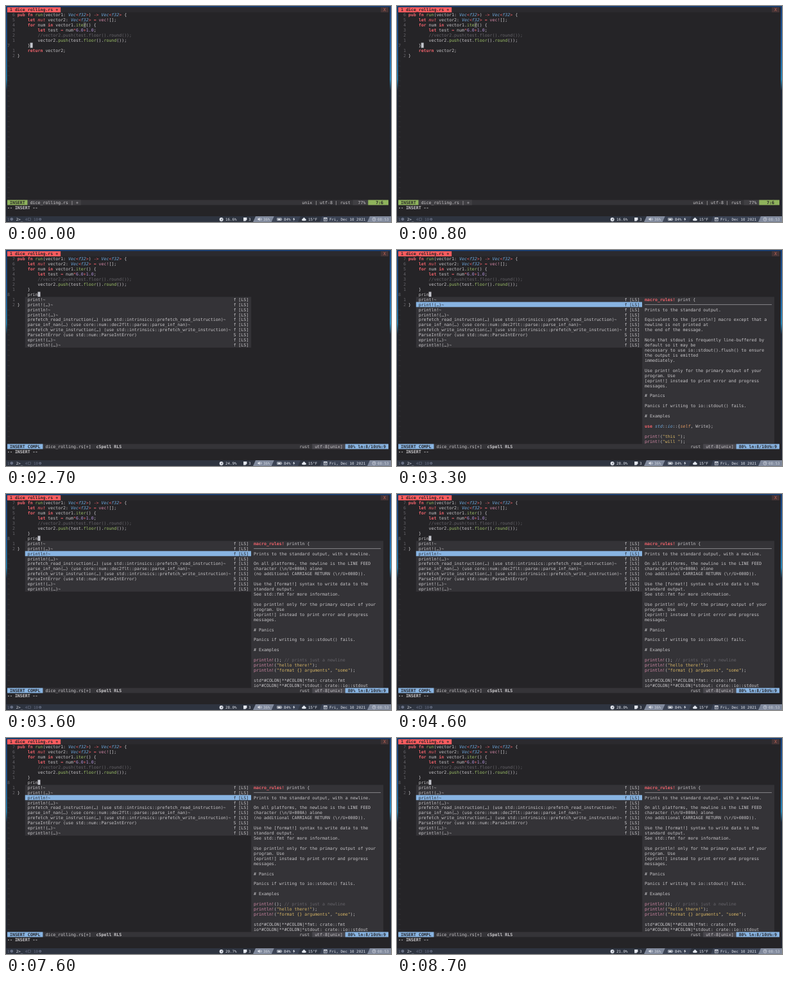
Recreate the animation shown at these times as an HTML page with a canvas. Size 600 by 338 pixels, loop 8800 ms.

```html
<!DOCTYPE html>
<html lang="en">
<head>
<meta charset="utf-8">
<title>Editor completion</title>
<style>
html, body { margin: 0; width: 100%; height: 100%; overflow: hidden; background: #252427; }
canvas { display: block; width: 600px; height: 338px; }
</style>
</head>
<body>
<canvas id="stage"></canvas>
<script>
const LOOP = 8800, CW = 3.96, RH = 7.935, LEFT = 2, TOP = 2;
const MONO = '"DejaVu Sans Mono", "Liberation Mono", monospace';
const C = {
  bg: '#252427', fg: '#c9c7ca', dim: '#67656b', faint: '#3f3d44', line: '#353438', panel: '#343337',
  red: '#f0626b', blue: '#6fa8dc', green: '#9dbf68', purple: '#b294d8', pink: '#d58aa8',
  yellow: '#d5b465', orange: '#e39a62', tab: '#fb5c5f', insert: '#8fb35c', pick: '#88b4e2', dark: '#252427'
};

const cv = document.getElementById('stage');
const dpr = window.devicePixelRatio || 1;
cv.width = 600 * dpr;
cv.height = 338 * dpr;
const g = cv.getContext('2d');
g.scale(dpr, dpr);
if ('textRendering' in g) g.textRendering = 'geometricPrecision';

const X = col => LEFT + col * CW;
const Y = row => TOP + row * RH;

function rect(x, y, w, h, color) {
  g.fillStyle = color;
  g.fillRect(x, y, w, h);
}

// Fill terminal cells from column a up to column b.
function cells(row, a, b, color, rows = 1) {
  rect(X(a), Y(row), (b - a) * CW, RH * rows, color);
}

// One character per terminal cell.
function put(row, col, text, color = C.fg, style = '') {
  g.font = style + ' 6.58px ' + MONO;
  g.fillStyle = color;
  [...text].forEach((ch, i) => {
    if (ch !== ' ') g.fillText(ch, X(col + i), Y(row) + 6.3);
  });
}

const RULES = [
  ['\\/\\/.*', C.dim],
  ['"[^"]*"', C.yellow],
  ['\\b(?:pub|fn|let|for|in|return|use|macro_rules!)(?![\\w])', C.red, 'bold'],
  ['\\bmut\\b', C.red, 'italic'],
  ['\\b(?:Vec|f32)\\b', C.blue, 'italic'],
  ['\\bself\\b', C.orange, 'italic'],
  ['\\b(?:std|io)(?=::)', C.blue, 'italic'],
  ['\\w+!', C.pink],
  ['\\w+(?=\\()', C.green],
  ['\\d+\\.\\d', C.purple],
  ['->|[=*+<>]', C.red]
];
const LEXER = new RegExp(RULES.map(r => '(' + r[0] + ')').join('|'), 'g');

function code(row, col, text) {
  let at = 0;
  for (const m of text.matchAll(LEXER)) {
    put(row, col + at, text.slice(at, m.index));
    const rule = RULES[m.slice(1).findIndex(v => v !== undefined)];
    put(row, col + m.index, m[0], rule[1], rule[2]);
    at = m.index + m[0].length;
  }
  put(row, col + at, text.slice(at));
}

const HEAD = [
  'pub fn run(vector1: Vec<f32>) -> Vec<f32> {',
  '    let mut vector2: Vec<f32> = vec![];',
  '    for num in vector1.iter() {',
  '        let test = num*6.0+1.0;',
  '        //vector2.push(test.floor().round());',
  '        vector2.push(test.floor().round());',
  '    }'
];
const TAIL = ['    return vector2;', '}'];

const ITEMS = [
  'print!~', 'print!(…)~', 'println!~', 'println!(…)~',
  'prefetch_read_instruction(…) (use std::intrinsics::prefetch_read_instruction)~',
  'parse_inf_nan(…) (use core::num::dec2flt::parse::parse_inf_nan)~',
  'prefetch_write_instruction(…) (use std::intrinsics::prefetch_write_instruction)~',
  'ParseIntError (use std::num::ParseIntError)',
  'eprint!(…)~', 'eprintln!(…)~'
];

const DOC_PRINT = `Prints to the standard output.

Equivalent to the [println!] macro except that a
newline is not printed at
the end of the message.

Note that stdout is frequently line-buffered by
default so it may be
necessary to use io::stdout().flush() to ensure
the output is emitted
immediately.

Use print! only for the primary output of your
program. Use
[eprint!] instead to print error and progress
messages.

# Panics

Panics if writing to io::stdout() fails.

# Examples

use std::io::{self, Write};

print!("this ");
print!("will ");`.split('\n');

const DOC_PRINTLN = `Prints to the standard output, with a newline.

On all platforms, the newline is the LINE FEED
character (\\n/U+000A) alone
(no additional CARRIAGE RETURN (\\r/U+000D)).

Use the [format!] syntax to write data to the
standard output.
See std::fmt for more information.

Use println! only for the primary output of your
program. Use
[eprint!] instead to print error and progress
messages.

# Panics

Panics if writing to io::stdout() fails.

# Examples

println!(); // prints just a newline
println!("hello there!");
println!("format {} arguments", "some");

std*#COLON|**#COLON|*fmt: crate::fmt
io*#COLON|**#COLON|*stdout: crate::io::stdout`.split('\n');

// Value of the last [time, value] step that has begun.
const at = (steps, t) => steps.filter(s => s[0] <= t).pop()[1];
const TYPED = [[0, null], [900, ''], [1500, 'p'], [1700, 'pr'], [1900, 'pri'], [2100, 'prin']];
const PICK = [[0, -2], [2300, -1], [3000, 0], [3300, 1], [3600, 2]];
const CPU = [[0, '16.6%'], [1100, '24.9%'], [3000, '28.0%'], [5200, '25.4%'], [6900, '20.7%'], [8600, '21.0%']];

function wallpaper() {
  const sky = g.createLinearGradient(0, 0, 0, 338);
  sky.addColorStop(0, '#17407a');
  sky.addColorStop(0.2, '#1c5fa6');
  sky.addColorStop(0.34, '#2384b8');
  sky.addColorStop(0.39, '#1d2738');
  sky.addColorStop(1, '#20232e');
  rect(0, 0, 600, 338, sky);
  rect(1.6, 1.6, 596.4, 327.4, C.bg);
}

function tabs() {
  cells(0, 0, 150, '#2b2a2e');
  cells(0, 0, 21, C.tab);
  put(0, 1, '1 dice_rolling.rs +', C.dark, 'bold');
  cells(0, 147, 150, '#453436');
  put(0, 148, 'X', '#c2665a');
}

function buffer(typed) {
  const fresh = typed !== null;
  const lines = fresh ? [...HEAD, '    ' + typed, ...TAIL] : [...HEAD, ...TAIL];
  const cur = fresh ? 7 : 6;
  if (!fresh) cells(3, 30, 31, '#58565d');
  lines.forEach((s, i) => {
    const row = i + 1;
    if (i === cur) put(row, 0, String(i + 1), C.dim);
    else put(row, 2, String(Math.abs(i - cur)), C.dim);
    code(row, 4, s);
  });
  for (let r = lines.length + 1; r < 38; r++) put(r, 0, '~', C.faint);
  cells(cur + 1, 4 + lines[cur].length, 5 + lines[cur].length, '#c4c6cd');
}

function popup(pick) {
  cells(9, 7, 96, C.panel, ITEMS.length);
  ITEMS.forEach((s, i) => {
    const on = i === pick, ink = on ? C.dark : C.fg;
    if (on) cells(9 + i, 7, 96, C.pick);
    put(9 + i, 8, s, ink);
    put(9 + i, 89, (i === 7 ? 'S' : 'f') + ' [LS]', ink);
  });
}

function preview(pick) {
  const ln = pick === 2, doc = ln ? DOC_PRINTLN : DOC_PRINT;
  cells(9, 96, 148, C.panel, 29);
  code(9, 97, 'macro_rules! ' + (ln ? 'println' : 'print') + ' {');
  rect(X(97), Y(10) + 3.6, CW * 50, 0.7, '#aaa8ad');
  const start = doc.indexOf('# Examples');
  doc.forEach((s, i) => {
    const isCode = i > start && !s.includes('#COLON');
    (isCode ? code : put)(11 + i, 97, s);
  });
}

function status(typed, open) {
  cells(38, 0, 150, C.line);
  if (open) {
    cells(38, 0, 14, C.pick);
    put(38, 1, 'INSERT COMPL', C.dark, 'bold');
    put(38, 15, 'dice_rolling.rs[+]');
    put(38, 35, 'cSpell RLS', C.fg, 'bold');
    put(38, 115, 'rust');
    cells(38, 120, 133, '#49474d');
    put(38, 121, 'utf-8[unix]');
    cells(38, 133, 150, C.pick);
    put(38, 134, '80% ln:8/10≡℅:9', C.dark, 'bold');
  } else {
    const fresh = typed !== null;
    cells(38, 0, 8, C.insert);
    put(38, 1, 'INSERT', C.dark, 'bold');
    cells(38, 8, 29, '#403f43');
    put(38, 9, 'dice_rolling.rs | +');
    put(38, 116, 'unix | utf-8 | rust');
    cells(38, 136, 142, '#403f43');
    put(38, 138, fresh ? '80%' : '77%');
    cells(38, 142, 150, C.insert);
    put(38, 145, fresh ? '8:' + (5 + typed.length) : '7:6', C.dark, 'bold');
  }
  put(39, 0, '-- INSERT --', C.fg, 'bold');
}

function disc(x, y, r, color) {
  g.fillStyle = color;
  g.beginPath();
  g.arc(x, y, r, 0, 7);
  g.fill();
}

function poly(pts, color) {
  g.fillStyle = color;
  g.beginPath();
  pts.forEach(p => g.lineTo(p[0], p[1]));
  g.fill();
}

function ring(x, y, r, a, b, color) {
  g.strokeStyle = color;
  g.lineWidth = 0.7;
  g.beginPath();
  g.arc(x, y, r, a, b);
  g.stroke();
}

function label(x, text, color) {
  g.font = '5.83px ' + MONO;
  g.fillStyle = color;
  [...text].forEach((ch, i) => g.fillText(ch, x + i * 3.51, 335.7));
}

// Bar segment with a slanted left edge.
function segment(a, b, color) {
  poly([[a + 4, 329], [b + 4, 329], [b, 338], [a, 338]], color);
}

function bar(cpu) {
  const ink = '#e0e4ec', low = '#687084', base = '#2e3440', lit = '#7f889b';
  rect(0, 329, 600, 9, base);
  segment(385, 414, lit);
  segment(414, 455, '#3b4354');
  segment(489, 563, '#3b4354');
  segment(563, 604, lit);

  label(2, '1', low);
  disc(8.8, 333.6, 2.4, low);
  label(15.7, '2', ink);
  label(19.2, '>_', ink);
  label(29.8, '4', low);
  g.strokeStyle = low;
  g.lineWidth = 0.6;
  g.strokeRect(34.3, 332, 4, 3.4);
  label(43, '10', low);
  disc(53.2, 333.8, 2, low);
  disc(53.2, 333.8, 0.8, base);

  disc(335.6, 333.9, 3, ink);
  poly([[335, 335], [337.2, 331.7], [336.2, 335.2]], base);
  label(342, cpu, ink);

  poly([[370, 331], [375.4, 331], [375.4, 334.2], [373.4, 336.4], [370, 336.4]], ink);
  label(378, '3', ink);

  poly([[392.4, 332.6], [393.8, 332.6], [395.6, 331], [395.6, 336.4], [393.8, 334.8], [392.4, 334.8]], ink);
  ring(395.6, 333.7, 1.3, -0.9, 0.9, ink);
  ring(395.6, 333.7, 2.6, -0.9, 0.9, ink);
  label(401, '36%', '#d0d6e0');

  g.strokeStyle = ink;
  g.strokeRect(422.8, 332, 6.2, 3.6);
  rect(423.6, 332.7, 4.2, 2.2, ink);
  rect(429.4, 333, 0.8, 1.6, ink);
  label(433, '84%', ink);
  poly([[449.2, 330.8], [447, 334.1], [448.5, 334.1], [447.9, 336.7], [450.4, 333.1], [449, 333.1]], ink);

  disc(462.6, 334.5, 1.6, ink);
  disc(464.4, 333.2, 2, ink);
  disc(466.2, 334.5, 1.6, ink);
  rect(462.6, 334.2, 3.6, 1.9, ink);
  label(471, '15°F', ink);

  g.strokeStyle = ink;
  g.lineWidth = 0.7;
  g.strokeRect(495.3, 331.4, 4.9, 4.8);
  rect(495.3, 331.2, 4.9, 1.5, ink);
  rect(496.4, 333.7, 2.7, 1.5, '#aab1bf');
  label(504, 'Fri, Dec 10 2021', ink);

  ring(573.6, 333.7, 2.5, 0, 7, ink);
  rect(573.3, 332.2, 0.6, 1.8, ink);
  rect(573.3, 333.5, 1.5, 0.6, ink);
  label(579, '08:53', '#d0d6e0');
}

function draw(t) {
  const typed = at(TYPED, t), pick = at(PICK, t);
  wallpaper();
  tabs();
  buffer(typed);
  if (pick > -2) popup(pick);
  if (pick >= 0) preview(pick);
  status(typed, pick > -2);
  bar(at(CPU, t));
}

let last = -1;
const t0 = performance.now();
function tick() {
  const t = Math.floor((performance.now() - t0) % LOOP / 100) * 100;
  if (t !== last) draw(last = t);
  requestAnimationFrame(tick);
}
tick();
</script>
</body>
</html>
```
